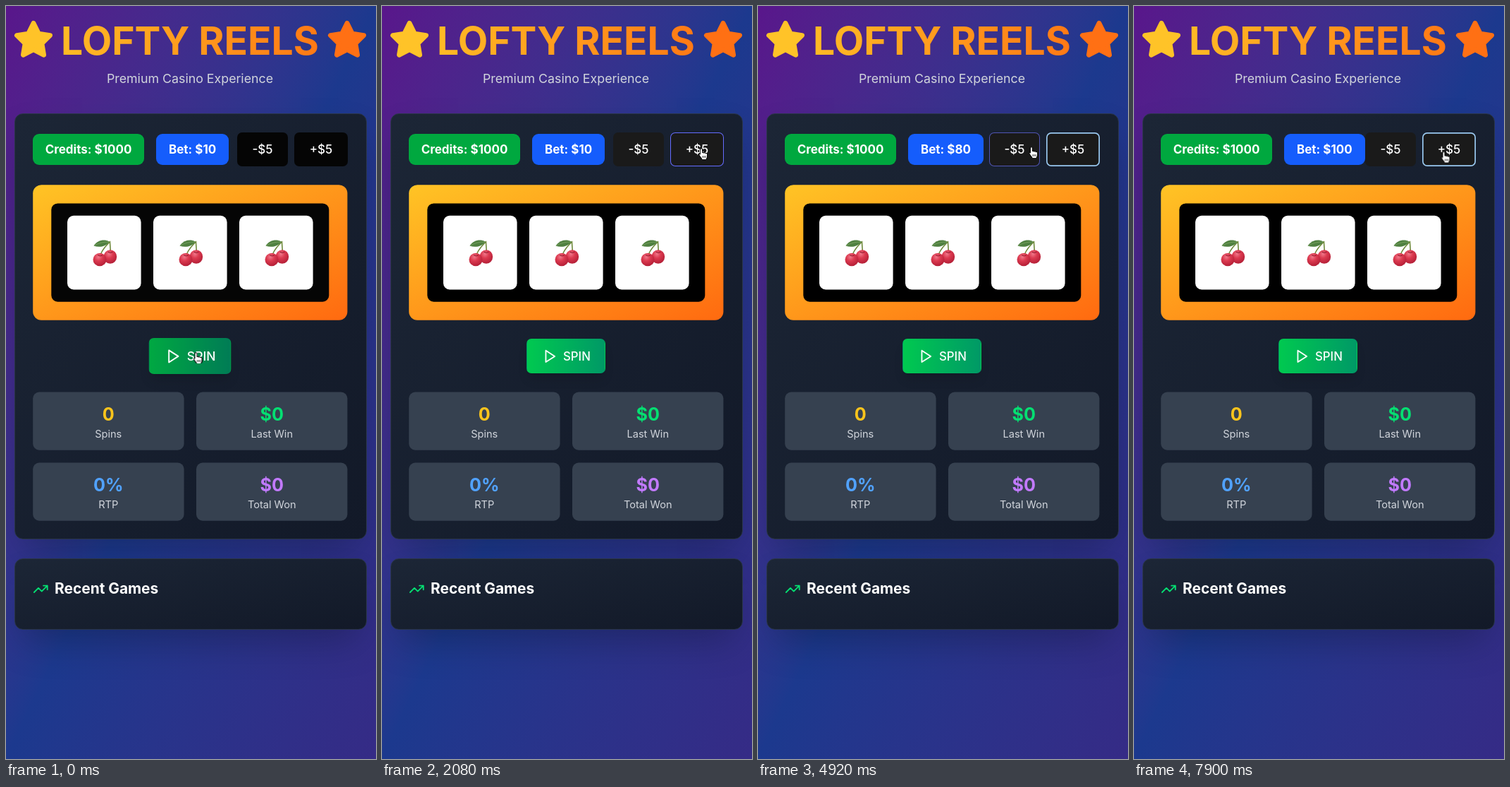
An HTML page for the animation above (8 s loop, 525x1066 px).

```html
<!DOCTYPE html>
<html lang="en">
<head>
<meta charset="utf-8">
<title>Slot machine</title>
<style>
@property --bet { syntax: '<integer>'; inherits: false; initial-value: 10; }

html, body { margin: 0; width: 100%; height: 100%; overflow: hidden; }
body {
  position: relative;
  font-family: Inter, 'Open Sans', sans-serif;
  color: #fff;
  background: linear-gradient(to bottom right in oklab, #59168b, #1c398e, #352b86);
}
body *, .bet::after { box-sizing: border-box; }
body > * { position: absolute; }
.loop, .bet::after {
  animation-duration: 8s;
  animation-delay: -15ms;
  animation-timing-function: step-end;
  animation-iteration-count: infinite;
}
.mid { display: flex; align-items: center; justify-content: center; white-space: nowrap; }

h1 {
  left: 11px; top: 18px; width: 500px; height: 61px; margin: 0;
  font-size: 55.2px; font-weight: 700;
  color: transparent;
  background: linear-gradient(90deg, #ffc628, #ff6d12);
  -webkit-background-clip: text; background-clip: text;
}
.star { top: 18.5px; width: 56px; height: 56px; overflow: visible; stroke-width: 7; stroke-linejoin: round; }
.tagline { left: 0; top: 90px; width: 522px; height: 25px; font-size: 17.8px; color: #d1d5dc; }

.panel {
  left: 11.5px; width: 500px;
  border: 1px solid #2a3547; border-radius: 12px;
  background: linear-gradient(to bottom right, #1c2636, #121928);
  box-shadow: 0 27px 54px -13px rgb(0 0 0 / .25);
}
.boxes { left: 0; top: 0; width: 525px; height: 1066px; }

.badge {
  top: 181px; height: 44px; padding: 0 18px;
  border-radius: 9px;
  font-size: 17px; font-weight: 700;
}
.credits { left: 38px; width: 158px; background: #00a83f; }
.bet { left: 213px; background: #155dfc; }
.bet span { white-space: pre; }
.bet::after { counter-reset: bet var(--bet); content: counter(bet); animation-name: bet; }

.step {
  top: 179px; height: 48px; border-radius: 7px;
  font-size: 17px; font-weight: 500;
}
.minus { left: 328px; width: 72px; animation-name: ink, minus; }
.plus { left: 409px; width: 76px; animation-name: ink, plus; }
.reels { animation-name: well; }

.spin {
  left: 205px; top: 471px; width: 112px; height: 49px;
  border: 1px solid transparent; border-radius: 7px;
  box-shadow: 0 11px 16px -3px rgb(0 0 0 / .12), 0 4px 6px -4px rgb(0 0 0 / .12);
  font-size: 16.8px; font-weight: 500;
  animation-name: spin;
}
.spin svg { position: absolute; left: 20.5px; top: 12.8px; }
.spin span { position: absolute; left: 51px; }
.line { fill: none; stroke: currentColor; stroke-width: 2; stroke-linecap: round; stroke-linejoin: round; }

.stat { width: 214.5px; height: 82.5px; }
.stat b, .stat i { position: absolute; left: 0; width: 100%; text-align: center; font-style: normal; }
.stat b { top: 15px; font-size: 25.2px; line-height: 32px; }
.stat i { top: 49px; font-size: 14.6px; line-height: 20px; color: #d1d5dc; }
.left { left: 38px; }
.right { left: 270px; }
.upper { top: 546.5px; }
.lower { top: 646.5px; }

.trend { left: 38px; top: 813.7px; color: #05df72; }
h2 { left: 69px; top: 812px; margin: 0; font-size: 20.9px; line-height: 26px; font-weight: 650; white-space: nowrap; }

.hand { left: -6.5px; top: -8px; width: 13px; height: 16px; animation-name: hand; }

@keyframes bet {
  0% { --bet: 10; }
  29.75% { --bet: 15; }
  35.375% { --bet: 20; }
  37.25% { --bet: 25; }
  39.125% { --bet: 30; }
  41% { --bet: 35; }
  42.75% { --bet: 45; }
  44.625% { --bet: 50; }
  46.5% { --bet: 55; }
  48.375% { --bet: 60; }
  50.25% { --bet: 65; }
  52.125% { --bet: 70; }
  54% { --bet: 75; }
  55.875% { --bet: 80; }
  65.25% { --bet: 75; }
  67.125% { --bet: 70; }
  69% { --bet: 65; }
  70.875% { --bet: 60; }
  78.125% { --bet: 65; }
  80% { --bet: 70; }
  81.875% { --bet: 75; }
  83.75% { --bet: 80; }
  85.625% { --bet: 85; }
  87.5% { --bet: 90; }
  89.375% { --bet: 95; }
  93.125%, 100% { --bet: 100; }
}
@keyframes ink {
  0% { background-color: #050505; }
  13%, 100% { background-color: #1a1a1a; }
}
@keyframes well {
  0% { fill: #050505; }
  13%, 100% { fill: #000; }
}
@keyframes plus {
  0% { box-shadow: inset 0 0 0 1px transparent; }
  16.625% { box-shadow: inset 0 0 0 1px #3a3d70; }
  18.5% { box-shadow: inset 0 0 0 1px #646cff; }
  27.875% { box-shadow: inset 0 0 0 1.7px #99c8f0; }
  63.375% { box-shadow: inset 0 0 0 1px transparent; }
  74.5% { box-shadow: inset 0 0 0 1px #35386a; }
  76.25%, 100% { box-shadow: inset 0 0 0 1.7px #99c8f0; }
}
@keyframes minus {
  0% { box-shadow: inset 0 0 0 1px transparent; }
  61.5% { box-shadow: inset 0 0 0 1px #5055b4; }
  63.375% { box-shadow: inset 0 0 0 1.7px #99c8f0; }
  76.25%, 100% { box-shadow: inset 0 0 0 1px transparent; }
}
@keyframes spin {
  0% { transform: scale(1.045); background-image: linear-gradient(90deg, #00a842, #007c55); }
  1.875% { transform: scale(1.05); background-image: linear-gradient(90deg, #00a63e, #007a55); }
  13% { transform: scale(1.02); background-image: linear-gradient(90deg, #00ba48, #008b5e); }
  14.875%, 100% { transform: none; background-image: linear-gradient(90deg, #00c950, #009966); }
}
@keyframes hand {
  0% { transform: translate(271.5px, 498px); }
  7.375% { transform: translate(268px, 498px); }
  9.25% { transform: translate(265.5px, 498px); }
  13% { transform: translate(340px, 380px); }
  14.875% { transform: translate(412px, 245px); }
  16.625% { transform: translate(436px, 187.5px); }
  18.5% { transform: translate(441px, 193px); }
  20.375% { transform: translate(447px, 200px); }
  22.25% { transform: translate(451px, 205px); }
  24.125% { transform: translate(454px, 208px); }
  26% { transform: translate(455px, 209px); }
  57.75% { transform: translate(443px, 208px); }
  59.625% { transform: translate(415px, 207px); }
  61.5% { transform: translate(390px, 207px); }
  63.375% { transform: translate(384px, 207px); }
  72.625% { transform: translate(415px, 210px); }
  74.5% { transform: translate(440.5px, 213px); }
  98.75%, 100% { transform: translate(441.5px, 213.5px); }
}
</style>
</head>
<body>
  <svg width="0" height="0">
    <defs>
      <path id="star" d="M0-24.7 7.3-10 23.5-7.6 11.8 3.8 14.5 20 0 12.4-14.5 20-11.8 3.8-23.5-7.6-7.3-10z"/>
      <linearGradient id="gold" x2="1" y2="1">
        <stop stop-color="#ffc425"/>
        <stop offset="1" stop-color="#ff6a10"/>
      </linearGradient>
      <radialGradient id="red" cx=".4" cy=".3" r=".75">
        <stop offset="0" stop-color="#f0788a"/>
        <stop offset=".4" stop-color="#dc3a50"/>
        <stop offset="1" stop-color="#b01c34"/>
      </radialGradient>
      <g id="tile">
        <rect width="104.6" height="104.6" rx="9" fill="#fff"/>
        <g transform="translate(35.500 33.700)">
          <path d="M25 3C21 8 13 14 11 24M25 3C25 9 26 15 26 21" fill="none" stroke="#6f8a3c" stroke-width="1.6" stroke-linecap="round"/>
          <path d="M24 3C17-1 7 1 2 9c8 3 18 1 22-6z" fill="#4f8040"/>
          <path d="M23 3.4C16 3.5 9 5 3 8.6" fill="none" stroke="#82a866" stroke-width=".8"/>
          <ellipse cx="25.4" cy="24.5" rx="9.3" ry="9.8" fill="url(#red)"/>
          <ellipse cx="10.5" cy="28.5" rx="9.5" ry="9.2" fill="url(#red)"/>
          <path d="M8 22.500q3 1.800 6 .2M22.500 18q3 1.800 6 .2" fill="none" stroke="#8d1529" stroke-linecap="round"/>
        </g>
      </g>
      <rect id="stat" width="214.4" height="82.2" rx="9" fill="#364150"/>
    </defs>
  </svg>

  <svg class="star" style="left:10.500px" viewBox="-28 -30.200 56 56" fill="#ffc328" stroke="#ffc328"><use href="#star"/></svg>
  <h1 class="mid">LOFTY REELS</h1>
  <svg class="star" style="left:455.500px" viewBox="-28 -30.200 56 56" fill="#ff7014" stroke="#ff7014"><use href="#star"/></svg>
  <div class="tagline mid">Premium Casino Experience</div>

  <div class="panel" style="top:152px;height:603px"></div>
  <div class="panel" style="top:782px;height:101px"></div>

  <svg class="boxes">
    <rect x="38.200" y="253.300" width="446.200" height="191.400" rx="12" fill="url(#gold)"/>
    <rect class="reels loop" x="64.300" y="279.400" width="394" height="139.300" rx="9"/>
    <use href="#tile" x="87" y="296.800"/>
    <use href="#tile" x="209" y="296.800"/>
    <use href="#tile" x="331" y="296.800"/>
    <use href="#stat" x="38.200" y="546.500"/>
    <use href="#stat" x="270" y="546.500"/>
    <use href="#stat" x="38.200" y="646.500"/>
    <use href="#stat" x="270" y="646.500"/>
  </svg>

  <div class="badge credits mid">Credits: $1000</div>
  <div class="badge bet mid"><span>Bet: $</span></div>
  <div class="step minus mid loop">-$5</div>
  <div class="step plus mid loop">+$5</div>

  <div class="spin mid loop">
    <svg class="line" width="21.800" height="21.800" viewBox="0 0 24 24"><path d="M6 3 20 12 6 21z"/></svg>
    <span>SPIN</span>
  </div>

  <div class="stat left upper"><b style="color:#fac41c">0</b><i>Spins</i></div>
  <div class="stat right upper"><b style="color:#05df72">$0</b><i>Last Win</i></div>
  <div class="stat left lower"><b style="color:#51a2ff">0%</b><i>RTP</i></div>
  <div class="stat right lower"><b style="color:#c27aff">$0</b><i>Total Won</i></div>

  <svg class="trend line" width="22.600" height="22.600" viewBox="0 0 24 24"><path d="M22 7 13.500 15.500 8.500 10.500 2 17M16 7h6v6"/></svg>
  <h2>Recent Games</h2>

  <svg class="hand loop" viewBox="0.500 .6 11.500 14.300">
    <path d="M4 1.200c.9 0 1.400.6 1.400 1.400v4c.3-.6 2-.6 2.200.3.500-.6 1.900-.4 2.100.5.6-.4 2 0 2 1.200v2.600c0 2.200-1.200 3.300-1.500 4.100H5.200C4 13.400 2 11 1.200 9.400c-.5-1 .7-1.800 1.400-1.100V2.600c0-.8.5-1.400 1.400-1.400z" fill="#fff" stroke="#000" stroke-width=".9"/>
    <path d="M5.800 10.500v2.500M7.600 10.500v2.500M9.400 10.500v2.500" stroke="#000" stroke-width=".7"/>
  </svg>
</body>
</html>
```
